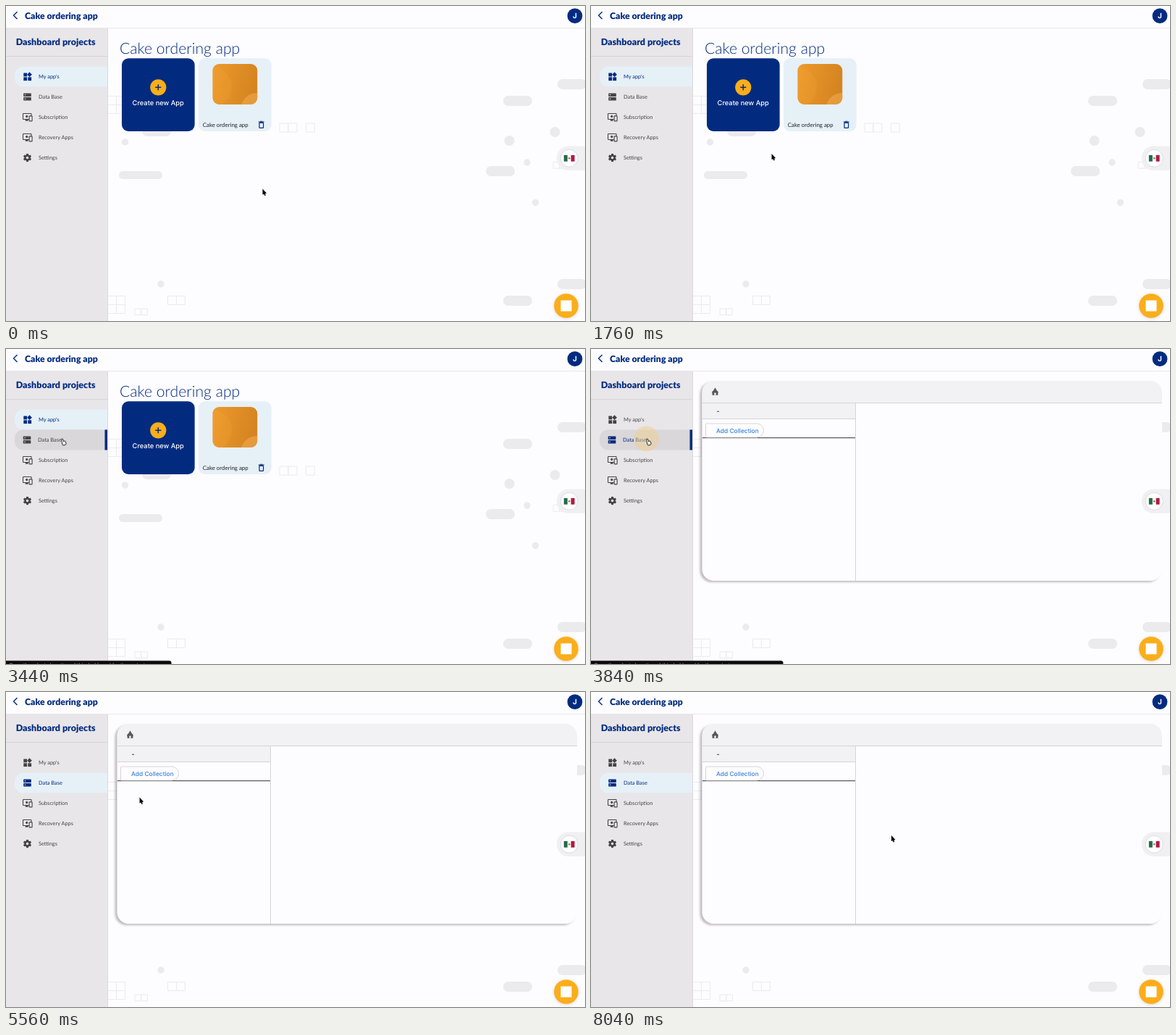
Write an HTML page with a canvas that moves like this. It is 800x435 px and loops after 8.12 s.

```html
<!DOCTYPE html>
<html lang="en">
<head>
<meta charset="utf-8">
<title>Dashboard</title>
<style>
html, body { margin: 0; width: 100%; height: 100%; overflow: hidden; background: #fdfcfe; }
canvas { display: block; width: 800px; height: 435px; }
</style>
</head>
<body>
<canvas id="stage"></canvas>
<script>
const W = 800, H = 435, LOOP = 8120;
const OPEN_DB = 3680, CLICK = 3560;
const NAVY = '#022b80', ORANGE = '#fbae1a', GREY = '#444446', PALE = '#e6f0f7';
const PAPER = '#fdfcfe', SIDE = '#e8e6e9', SHAPE = '#ebeaec', BAND = '#f2f1f3', LINE = '#d6d4d8';
const SIDE_W = 140, ROW_TOP = 83.5, ROW_H = 28, CARD = 100.7;
const APP = 'Cake ordering app';
const MENU = ["My app's", 'Data Base', 'Subscription', 'Recovery Apps', 'Settings'];

const canvas = document.getElementById('stage');
const ctx = canvas.getContext('2d');
const dpr = window.devicePixelRatio || 1;
canvas.width = W * dpr;
canvas.height = H * dpr;
ctx.textRendering = 'geometricPrecision';

const clamp = v => Math.min(1, Math.max(0, v));
const smooth = u => u * u * (3 - 2 * u);
const lato = (size, weight = 400) => `${weight} ${size}px Lato, sans-serif`;
const inter = (size, weight = 500) => `${weight} ${size}px Inter, sans-serif`;

function paint(fill, stroke) {
  if (fill) { ctx.fillStyle = fill; ctx.fill(); }
  if (stroke) { ctx.strokeStyle = stroke; ctx.stroke(); }
}

function rect(x, y, w, h, fill) {
  ctx.fillStyle = fill;
  ctx.fillRect(x, y, w, h);
}

function box(x, y, w, h, r, fill, stroke) {
  ctx.beginPath();
  ctx.roundRect(x, y, w, h, r);
  paint(fill, stroke);
}

function disc(x, y, r, fill, stroke) {
  ctx.beginPath();
  ctx.arc(x, y, r, 0, Math.PI * 2);
  paint(fill, stroke);
}

// Triangle pointing up, or a square standing on its corner.
function peak(x, y, r, corners, fill) {
  ctx.beginPath();
  for (let i = 0; i < corners; i++) {
    const a = i * 2 * Math.PI / corners - Math.PI / 2;
    ctx.lineTo(x + r * Math.cos(a), y + r * Math.sin(a));
  }
  ctx.closePath();
  paint(fill);
}

function text(str, x, y, font, color, align = 'left') {
  ctx.font = font;
  ctx.fillStyle = color;
  ctx.textAlign = align;
  ctx.fillText(str, x, y);
}

function at(x, y, draw) {
  ctx.save();
  ctx.translate(x, y);
  draw();
  ctx.restore();
}

function withShadow(color, blur, dx, dy, draw) {
  ctx.save();
  ctx.shadowColor = color;
  ctx.shadowBlur = blur * dpr;
  ctx.shadowOffsetX = dx * dpr;
  ctx.shadowOffsetY = dy * dpr;
  draw();
  ctx.restore();
}

// Rest, glide to the menu, small nudge, then out to the panel.
function cursorAt(t) {
  const pos = { x: 354.5, y: 252.5 };
  const glide = (from, to, x, y) => {
    const k = smooth(clamp((t - from) / (to - from)));
    pos.x += (x - pos.x) * k;
    pos.y += (y - pos.y) * k;
  };
  glide(790, 3113, 77, 124);
  glide(4300, 4920, 92.5, 124.5);
  glide(5300, 6040, 415, 198);
  return pos;
}

function rowAt({ x, y }) {
  const row = Math.floor((y - ROW_TOP) / ROW_H);
  return x > 12 && x < SIDE_W && MENU[row] ? row : -1;
}

const pill = (x, y, w = 40, h = 14) => box(x, y, w, h, h / 2, SHAPE);

function cells(x, y, size, cols, rows) {
  for (let i = 0; i < cols * rows; i++) {
    box(x + size * (i % cols), y + size * Math.floor(i / cols), size, size, 0, null, '#ebeaee');
  }
}

function patternTile() {
  pill(762, 101);
  pill(687, 124);
  pill(663, 221);
  pill(156, 228, 60, 11);
  pill(188, 166);
  disc(758.5, 174, 7, SHAPE);
  disc(695.5, 186, 7, SHAPE);
  disc(720, 216, 4.7, SHAPE);
  disc(731.5, 271.5, 4.7, SHAPE);
  disc(164.5, 188, 4.7, SHAPE);
  disc(214, 108, 4.7, SHAPE);
  cells(140.5, 124.5, 12, 2, 2);
  cells(223.5, 124.5, 12, 2, 1);
  cells(178, 142, 8.7, 2, 1);
  cells(378, 162, 12, 2, 1);
  cells(414.5, 162, 12, 1, 1);
  cells(756, 215.5, 8.7, 2, 1);
}

function drawBackdrop() {
  rect(0, 0, W, H, PAPER);
  ctx.lineWidth = 1;
  for (let y = 0; y < H; y += 276) at(0, y, patternTile);
}

function drawHeader() {
  rect(0, 0, W, 30, PAPER);
  rect(0, 30, W, 1, '#e8e6ea');
  at(10.5, 13, () => {
    ctx.lineWidth = 1.4;
    ctx.beginPath();
    for (const y of [-5, 0, 5]) ctx.lineTo(Math.abs(y), y);
    paint(null, NAVY);
  });
  text(APP, 26, 18.3, lato(12.3, 900), NAVY);
  disc(786, 13.7, 10.4, NAVY);
  text('J', 785.8, 17.4, inter(10, 700), '#fff', 'center');
}

function widgetsIcon(c) {
  rect(-5.2, -5, 4.8, 4.8, c);
  rect(-5.2, 0.8, 4.8, 4.8, c);
  rect(0.8, 0.8, 4.8, 4.8, c);
  peak(3, -2.8, 3.4, 4, c);
}

function storageIcon(c) {
  for (const y of [-5, 0.5]) {
    box(-5.3, y, 10.6, 4.6, 0.7, c);
    disc(-3, y + 2.3, 0.8, SIDE);
  }
}

function devicesIcon(c) {
  ctx.lineWidth = 1.1;
  box(-6, -5, 11.5, 8, 0.6, null, c);
  rect(-2.7, 3, 3.8, 2.2, c);
  peak(-0.8, -1, 2, 4, c);
  box(2.6, -1.6, 4, 7, 0.7, SIDE, c);
}

function gearIcon(c) {
  for (let i = 0; i < 6; i++) {
    ctx.rotate(Math.PI / 3);
    rect(-1.5, -5.6, 3, 4, c);
  }
  disc(0, 0, 4.2, c);
  disc(0, 0, 1.8, SIDE);
}

const ICONS = [widgetsIcon, storageIcon, devicesIcon, devicesIcon, gearIcon];

function drawSidebar(active, hover) {
  rect(0, 31, SIDE_W, H - 31, SIDE);
  rect(SIDE_W, 31, 1, H - 31, '#dad8dc');
  rect(0, 69, SIDE_W, 1, LINE);
  text('Dashboard projects', 13.7, 54.2, lato(12.5, 900), NAVY);
  MENU.forEach((label, i) => {
    const top = ROW_TOP + ROW_H * i, over = i === hover;
    const color = i === active ? NAVY : GREY;
    if (over || i === active) {
      box(12, top, SIDE_W - 12, ROW_H, [12, 0, 0, 12], over ? '#d9d7da' : PALE);
    }
    if (over) rect(SIDE_W - 3.5, top, 3.5, ROW_H, NAVY);
    at(over ? 29 : 29.5, top + ROW_H / 2, () => ICONS[i](color));
    text(label, over ? 44 : 45, top + 16.6, lato(7.4), color);
  });
}

function drawPicture() {
  ctx.save();
  ctx.beginPath();
  ctx.roundRect(285.5, 80, 61.8, 56, 9);
  ctx.clip();
  const g = ctx.createLinearGradient(286, 90, 347, 105);
  g.addColorStop(0, '#ec992c');
  g.addColorStop(1, '#d48420');
  rect(285, 79, 63, 58, g);
  disc(284, 112, 28, 'rgba(255,178,66,.14)');
  disc(347, 143, 23, 'rgba(245,178,90,.5)');
  ctx.restore();
}

function trashIcon() {
  ctx.lineWidth = 1.2;
  box(-2.8, -2.6, 5.6, 7, 0.7, null, NAVY);
  rect(-3.9, -4.5, 7.8, 1.2, NAVY);
  rect(-1.6, -5.2, 3.2, 1, NAVY);
}

function drawApps() {
  text(APP, 157, 65.5, lato(21.2, 300), NAVY);
  box(160, 72.3, CARD, CARD, 9, NAVY);
  at(210.3, 112.3, () => {
    disc(0, 0, 11.1, ORANGE);
    rect(-4.1, -0.75, 8.2, 1.5, NAVY);
    rect(-0.75, -4.1, 1.5, 8.2, NAVY);
  });
  text('Create new App', 210.2, 137.3, inter(9.3), '#fff', 'center');
  box(266, 72.3, CARD, CARD, 9, PALE);
  drawPicture();
  text(APP, 271.7, 167.4, lato(7.9), '#222');
  at(352.8, 164, trashIcon);
}

function homeIcon() {
  const c = '#58575a';
  peak(0, -0.6, 5.2, 3, c);
  rect(-3.9, -1, 7.8, 5.8, c);
  rect(-1.2, 1.5, 2.4, 3.3, BAND);
}

function drawDatabase() {
  const x = 153.5, y = 44, w = 635.5, h = 276, split = 365;
  withShadow('rgba(100,95,105,.4)', 3, -3, 2, () => box(x, y, w, h, 16, PAPER));
  ctx.save();
  ctx.clip();
  rect(x, y, w, 30, BAND);
  rect(x, 74, w, 1, LINE);
  rect(x, 75, split - x, 21, BAND);
  rect(x, 96, split - x, 1, LINE);
  rect(split, 74, 1, h, LINE);
  rect(x, 122, split - x, 1.2, '#555558');
  ctx.restore();
  at(171.5, 59, homeIcon);
  text('-', 175.5, 89, inter(9, 600), '#333', 'center');
  ctx.lineWidth = 1;
  box(158.5, 103, 80, 19, [1, 9.5, 9.5, 1], PAPER, LINE);
  text('Add Collection', 173, 116.4, inter(8.4), '#3b82da');
}

function drawFloating() {
  box(761, 193.5, 50, 33.5, 16, '#f0eff1');
  at(778.2, 210.3, () => {
    ctx.lineWidth = 0.8;
    disc(0, 0, 12, '#fff', LINE);
    rect(-7.4, -4.4, 5, 8.8, '#246b4c');
    rect(2.4, -4.4, 5, 8.8, '#b5173c');
    disc(0, 0, 1.3, '#8b7b56');
  });
  withShadow('rgba(0,0,0,.14)', 4, 0, 1, () => disc(774, 414, 16.8, ORANGE));
  rect(766.5, 406.5, 15, 15, '#fff');
}

function drawStatus(width) {
  box(-4, 430.5, width + 4, 10, [0, 3, 0, 0], '#0b0b0c');
  text('Open the selected section of this dashboard for the project', 4, 439.2, lato(7.3), '#a9a9ad');
}

function drawRipple(t) {
  const u = (t - CLICK) / 620;
  if (u < 0 || u > 1) return;
  ctx.globalAlpha = 0.5 * clamp((1 - u) * 2.2);
  disc(76.5, 124, 9 + 8.5 * clamp(u * 2.4), '#f0cf8e');
  ctx.globalAlpha = 1;
}

function arrowCursor() {
  const ink = '#0a0a0a';
  ctx.lineWidth = 1.7;
  ctx.beginPath();
  ctx.moveTo(2, 5);
  ctx.lineTo(3.6, 9.2);
  paint(null, ink);
  ctx.beginPath();
  ctx.moveTo(0, 0);
  ctx.lineTo(0, 8);
  ctx.lineTo(5.5, 6);
  ctx.closePath();
  paint(ink);
}

function handCursor() {
  ctx.lineWidth = 0.9;
  at(0.4, 0, () => {
    ctx.rotate(-0.25);
    box(-1, 0, 2, 7, 1, '#fff', '#111');
    box(-1.4, 3.8, 5.2, 5.4, 1.6, '#fff', '#111');
    rect(-0.6, 2.4, 1.2, 3, '#fff');
  });
}

function render(t) {
  const cursor = cursorAt(t), hover = rowAt(cursor), inDb = t >= OPEN_DB;
  ctx.setTransform(dpr, 0, 0, dpr, 0, 0);
  drawBackdrop();
  if (inDb) drawDatabase(); else drawApps();
  drawSidebar(inDb ? 1 : 0, hover);
  drawHeader();
  drawFloating();
  if (hover >= 0) drawStatus(inDb ? 265.5 : 228.5);
  drawRipple(t);
  at(cursor.x, cursor.y, hover >= 0 ? handCursor : arrowCursor);
}

const start = performance.now();
function tick() {
  render((performance.now() - start) % LOOP);
  requestAnimationFrame(tick);
}
tick();
</script>
</body>
</html>
```
